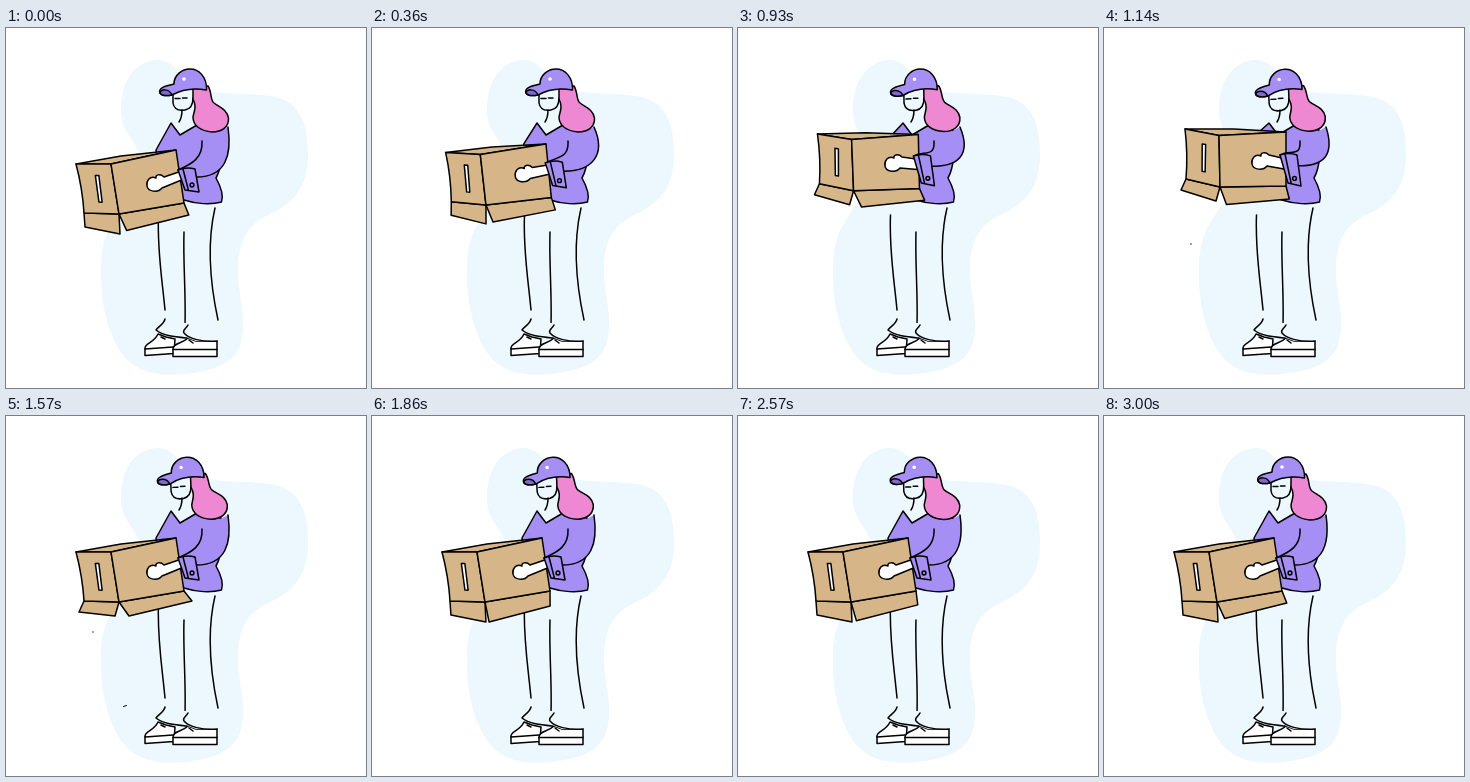
Animation of 360x360 px, one loop 3.07 s. Source, as an HTML page:

```html
<!DOCTYPE html>
<html lang="en">
<head>
<meta charset="utf-8">
<title>Woman shaking a box</title>
<style>
html, body { margin: 0; width: 100%; height: 100%; overflow: hidden; background: #fff; }
svg { display: block; width: 100vw; height: 100vh; }
.ink { fill: none; stroke: #000; stroke-width: 1.5; stroke-linecap: round; stroke-linejoin: round; }
.white { fill: #fff; }
.sky { fill: #ecf8fe; }
.purple { fill: #a58ff4; }
.dark { fill: #7d6bc9; }
.pink { fill: #ee88d2; }
.tan { fill: #d6b688; }
.bare { stroke: none; }
</style>
</head>
<body>
<svg viewBox="0 0 360 360">
  <path class="sky" d="M150 32C171 31 174 54 195 61C216 68 244 64 269 69C294 74 302 96 302 127C302 158 288 176 262 187C239 198 231 216 232 248C233 270 240 287 236 309C232 334 210 343 178 346C143 349 121 341 108 312C97 288 94 262 95 235C97 196 116 183 130 160C143 137 132 121 122 106C113 92 113 75 119 57C125 42 136 33 150 32Z"/>

  <g class="ink">
    <path d="M152.500 187C151 222 156 250 159 282M178 204C177 236 180 265 179 297M209 180C202 210 203 250 212 292"/>
    <path class="white" d="M139 320C139 315 148 315 152 306L160 309L169 311L168 325.500L139 327.500Z"/>
    <path d="M139 321L167 319"/>
    <path class="white" d="M167 321C167 315 176 316 182 310L190 313L211 313L211 328.500L167 328.500Z"/>
    <path d="M167 321.500L211 321.500"/>
    <path class="sky bare" d="M159 291L150 302C160 308 170 309 182 310L190 313L211 313L211 297L179 295Z"/>
    <path d="M159 291C158 296 153 298 150 302C157 308 170 309 181 310M182 297C180 301 176 302 178 305C183 311 196 314 211 313M155 309L159 311M183 312L187 315"/>
  </g>

  <path id="torso" class="ink purple"/>
  <path class="ink" d="M176 82C176 87 175 91 173 94"/>

  <g class="ink tan">
    <path id="flapL"/>
    <path id="flapR"/>
    <path id="top"/>
    <path id="side"/>
    <path id="front"/>
    <path id="slot" class="white"/>
  </g>

  <path id="hand" class="ink white"/>
  <path id="sleeve" class="ink purple"/>
  <path id="cuff" class="ink purple"/>
  <circle id="button" class="ink" r="1.900"/>

  <g id="head" class="ink">
    <path d="M167 64L167 75C168 81 173 83 179 82C185 81 187 77 187 70"/>
    <path d="M169 70.500L174 70.500M176.500 70L181 70"/>
    <path class="pink" d="M187 60L202 58C206 64 204 72 208 75C213 79 221 81 222.500 90C223 99 216 104 206 104C195 103 187 98 187 89C188 83 191 79 187 71Z"/>
    <path class="purple" d="M168 56C168 47 176 41 184 41C193 41 201 49 200.500 62C190 60 178 60 166 67C161 68 156 68 154 65C152 60 159 58 168 56Z"/>
    <path class="dark" d="M154 65C154 61 163 60 166 67C161 68 156 68 154 65Z"/>
    <circle class="white bare" cx="178" cy="51" r="1.800"/>
  </g>

  <path id="sparks" class="ink" style="stroke-width:1"/>
</svg>
<script>
const LOOP = 3070, STEP = 71.4;
const $ = id => document.getElementById(id);
const draw = (id, d) => $(id).setAttribute("d", d);
const lerp = (a, b, u) => a + (b - a) * u;
const mix = (p, q, u) => p.map((v, i) => lerp(v, q[i], u));
const add = ([x, y], dx, dy) => [x + dx, y + dy];
const poly = (...pts) => `M${pts.join("L")}Z`;

// Straight lines between [time, value] keys.
function at(keys, t) {
  const i = keys.findIndex(k => k[0] > t);
  if (i < 0) return keys[keys.length - 1][1];
  const [t0, a] = keys[i - 1], [t1, b] = keys[i];
  return lerp(a, b, (t - t0) / (t1 - t0));
}

// Slow lift, sudden drop, rest; 0 is low and 1 is high.
const lift = [[0, 0], [1080, 1], [1220, 1], [1285, 0]];
// 0 is a closed flap, 1 an open one.
const leftOpen = [[0, 0], [360, .2], [710, 1], [1570, 1], [1860, 0]];
const rightOpen = [[0, .6], [360, .5], [710, .9], [1140, .4], [1290, 1], [1570, 1], [1860, 0], [2400, 0], [2860, .6]];
const tilt = [[0, 0], [780, 0], [1070, 1], [2400, 1], [2860, 0]];

function drawBox(t, s) {
  const tl = mix([70, 136], [81, 101], s), back = mix([115, 128], [130, 101], s);
  const tr = mix([170, 122], [182, 104], s), mid = mix([105, 136], [115, 107.5], s);
  const bl = mix([78, 185], [82, 151], s), bm = mix([113, 186], [116, 159], s);
  const br = mix([178, 175], [182, 158], s);
  const l = at(leftOpen, t), r = at(rightOpen, t);
  const bow = add(mix(tl, bl, .5), 2.5, 0);
  const inSide = (u, v) => mix(mix(tl, mid, u), mix(bl, bm, u), v);

  draw("flapL", poly(bl, bm, add(bm, 1 - 5 * l, 20 - 6 * l), add(bl, 1 - 6 * l, 14 - 3 * l)));
  draw("flapR", poly(bm, br, add(br, 8 * r, 15 - 5 * r), add(bm, 4 + 6 * r, 20 - 6 * r)));
  draw("top", poly(tl, back, tr, mid));
  draw("side", `M${tl}L${mid}L${bm}L${bl}Q${bow} ${tl}Z`);
  draw("front", poly(mid, tr, br, bm));
  draw("slot", poly(inSide(.5, .23), inSide(.6, .23), inSide(.57, .77), inSide(.48, .77)));
}

function drawArm(s) {
  const arc = Math.sin(Math.PI * s);
  const joint = (low, high) => add(mix(low, high, s), 0, -2.5 * arc);
  const c1 = joint([172, 142], [176, 127]), c2 = joint([179, 162], [184, 155]);
  const c3 = joint([193, 164], [197, 158]), c4 = joint([189, 141], [193, 127]);
  const seam = mix(c4, c3, .35), hem = mix(c2, c3, .5);
  const hand = joint([150, 156], [157, 134]);
  const shoulder = mix([150, 122], [155, 104], s);
  const elbow = lerp(226, 231, s) + 8 * arc;
  const h = (x, y) => add(hand, x, y) + " ";

  draw("torso", `M${shoulder}L165 95L174 107L191 97L215 102C218 115 216 140 210 150` +
    `C215 159 218 167 215.500 174C205 177 190 176 178 172L158 165Z`);
  draw("hand", `M${mix(c1, c2, .1)}L${h(8, -7)}C${h(4, -11)}${h(-1, -9)}${h(0, -6)}` +
    `C${h(-6, -9)}${h(-10, -3)}${h(-9, 2)}C${h(-8, 8)}${h(2, 9)}${h(6, 4)}L${mix(c1, c2, .5)}`);
  draw("sleeve", `M196 113C197 130 186 ${c1[1] - 6} ${c1}L${seam}C220 ${seam[1]} ${elbow} 127 222 99`);
  draw("cuff", `M${c1}Q${add(mix(c1, c4, .5), 0, -3)} ${c4}L${c3}L${c2}Z` +
    `M${add(c1, 5, -1)}L${mix(c2, c3, .25)}`);
  $("button").setAttribute("cx", hem[0]);
  $("button").setAttribute("cy", hem[1] - 6);
}

// Short strokes that grow and shrink: begin, x, y, length, angle.
const SPARK = 470;
const sparks = [[1120, 87, 216, 5, 1.57], [1240, 119, 290, 4, -.35], [1980, 95, 268, 8.5, -.75]];

function drawSparks(t) {
  const live = sparks.filter(([begin]) => t > begin && t < begin + SPARK);
  draw("sparks", live.map(([begin, x, y, len, angle]) => {
    const half = len / 2 * Math.sin(Math.PI * (t - begin) / SPARK);
    const dx = half * Math.cos(angle), dy = half * Math.sin(angle);
    return `M${x - dx} ${y - dy}L${x + dx} ${y + dy}`;
  }).join(""));
}

function render(ms) {
  const t = Math.floor((ms % LOOP + 4) / STEP) * STEP % LOOP;
  const s = at(lift, t), k = at(tilt, t);
  drawBox(t, s);
  drawArm(s);
  drawSparks(t);
  $("head").setAttribute("transform", `translate(${-k} ${-k / 2}) rotate(${-2.5 * k} 200 95)`);
}

const begin = performance.now();
function loop() {
  render(performance.now() - begin);
  requestAnimationFrame(loop);
}
loop();
</script>
</body>
</html>
```
